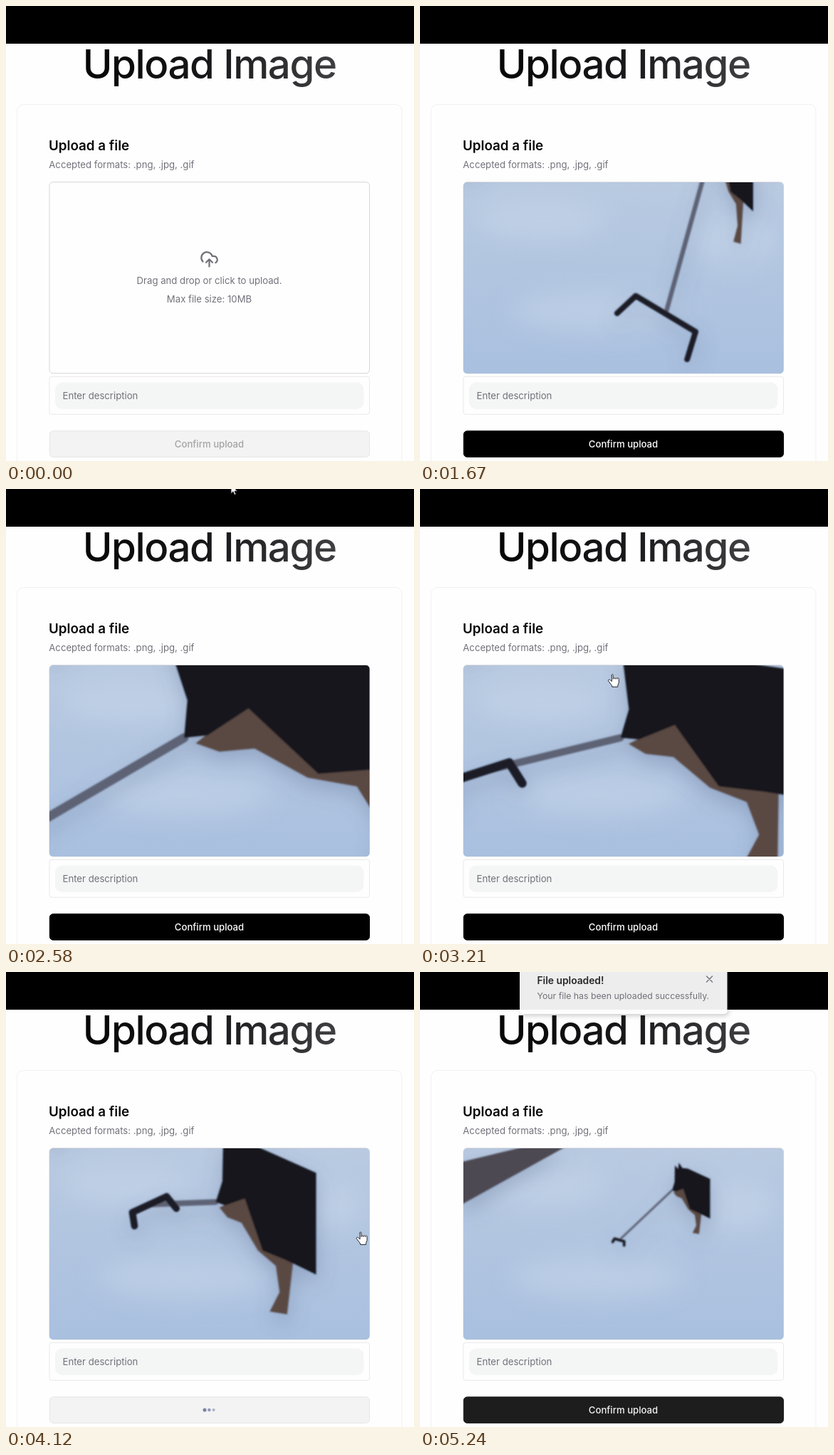
Write an HTML page that moves like this. It is 573 px wide and 640 px high and loops after 5310 ms.

```html
<!DOCTYPE html>
<html lang="en">
<head>
<meta charset="utf-8">
<title>Upload Image</title>
<style>
  html, body { margin: 0; width: 100%; height: 100%; overflow: hidden; background: #fefefe; }
  svg { display: block; }
  text { font: 13.16px Inter, sans-serif; fill: #71717a; }
  .mid { text-anchor: middle; }
  #title { font-size: 56.4px; font-weight: 500; letter-spacing: -.025em; fill: url(#ink); }
  #heading { font-size: 18.8px; font-weight: 600; fill: #09090b; }
  #label { font-weight: 500; }
  .line { fill: none; stroke-linecap: round; stroke-linejoin: round; }
</style>
</head>
<body>
<svg width="573" height="640" viewBox="0 0 573 640">
  <defs>
    <linearGradient id="ink" gradientUnits="userSpaceOnUse" x1="109" x2="463" y1="0" y2="0">
      <stop stop-color="#060607"/><stop offset=".5" stop-color="#18181a"/><stop offset="1" stop-color="#3f3f42"/>
    </linearGradient>
    <linearGradient id="snow" x2="0" y2="1">
      <stop stop-color="#b9cae1"/><stop offset="1" stop-color="#a9c0df"/>
    </linearGradient>
    <clipPath id="frame"><rect x="61" y="248" width="449.5" height="269" rx="5"/></clipPath>
    <filter id="soft" filterUnits="userSpaceOnUse" x="0" y="200" width="573" height="380">
      <feGaussianBlur stdDeviation="1.3"/>
      <feDropShadow dy="12" stdDeviation="14" flood-color="#5f7090" flood-opacity=".35"/>
    </filter>
    <filter id="haze" x="-50%" y="-50%" width="200%" height="200%"><feGaussianBlur stdDeviation="16"/></filter>
    <filter id="shadow"><feDropShadow dy="3" stdDeviation="3" flood-opacity=".2"/></filter>
  </defs>

  <rect width="573" height="53" fill="#000"/>
  <text id="title" class="mid" x="285.7" y="102">Upload Image</text>
  <rect x="15.5" y="138.5" width="540.5" height="540" rx="9" fill="#fefefe" stroke="#f1f1f3"/>
  <text id="heading" x="60" y="203">Upload a file</text>
  <text x="60.3" y="228">Accepted formats: .png, .jpg, .gif</text>

  <rect id="drop" x="61" y="247.7" width="449.5" height="269" rx="5" fill="#fefefe"/>
  <g id="icon" class="line" stroke="#71717a" stroke-width="2">
    <path d="M4 14.899A7 7 0 1 1 15.71 8h1.79a4.5 4.5 0 0 1 2.5 8.242M12 12v9M16 16l-4-4-4 4"/>
  </g>
  <text class="mid" x="285.5" y="391">Drag and drop or click to upload.</text>
  <text class="mid" x="285.5" y="417.3">Max file size: 10MB</text>

  <g id="photo" clip-path="url(#frame)">
    <rect x="61" y="247" width="450" height="271" fill="url(#snow)"/>
    <g fill="#c6d5ea" filter="url(#haze)" opacity=".55">
      <ellipse cx="170" cy="300" rx="90" ry="28"/><ellipse cx="250" cy="430" rx="120" ry="30"/>
      <ellipse cx="440" cy="330" rx="60" ry="35"/>
    </g>
    <g filter="url(#soft)">
      <path id="fence" d="M55 268L150 245H206L55 329z" fill="#4d4a53"/>
      <path id="handle" class="line" stroke="#5d6274"/>
      <path id="blade" class="line" stroke="#1b1d27" vector-effect="non-scaling-stroke" d="M-.6 .35L-.5 0H.5L.6 .4"/>
      <g id="dog">
        <path d="M8 8L62-10 100 68 165 85 152 162 115 158 136 130 128 92 90 70 55 30 25 22z" fill="#5a4842"/>
        <path d="M0 0L14-30 16-92 34-78 38-102 58-82 88-80 214-42V105L150 84 100 70 62-5 20 5z" fill="#17171f"/>
      </g>
    </g>
  </g>

  <rect x="61" y="521.3" width="449.5" height="53" rx="3" fill="#fefefe" stroke="#e9e9eb"/>
  <rect x="69" y="529.5" width="433.5" height="37.5" rx="10" fill="#f4f5f5"/>
  <text x="79.5" y="553">Enter description</text>

  <rect id="button" x="61.3" y="597.8" width="449.2" height="36.6" rx="5"/>
  <text id="label" class="mid" x="285.5" y="621">Confirm upload</text>
  <g id="dots" fill="#5f6e9c">
    <circle cx="279" cy="616"/><circle cx="285.4" cy="616"/><circle cx="291.6" cy="616"/>
  </g>

  <g id="toast">
    <rect x="140" y="-20" width="291.5" height="79" rx="5" fill="#fff" fill-opacity=".92" filter="url(#shadow)"/>
    <text x="164.5" y="16.8" style="font-size:13.8px;font-weight:600;fill:#27272a">File uploaded!</text>
    <text x="164.5" y="38" style="font-size:12.3px">Your file has been uploaded successfully.</text>
    <path class="line" d="M402.5 6l8 8m0-8l-8 8" stroke="#71717a" stroke-width="1.4"/>
  </g>
  <path id="cursor" fill="#fff" stroke="#26262c" stroke-linejoin="round"/>
</svg>
<script>
const LOOP = 5310, HOLD = 270, STEP = 70;
const PICK = 1390, RETURN = 1880, HOVER = 3500, SEND = 3840, DONE = 5030, LEAVE = 4750;

const $ = id => document.getElementById(id);
const set = (id, attrs) => { for (const k in attrs) $(id).setAttribute(k, attrs[k]); };
const show = (id, opacity) => set(id, { opacity: +opacity });
const ramp = (t, from, to) => Math.min(1, Math.max(0, (t - from) / (to - from)));
const blend = (a, b, p) => a.map((v, i) => v + (b[i] - v) * p);

// Rows start with their time
function between(rows, t) {
  let i = 0;
  while (i < rows.length - 2 && t >= rows[i + 1][0]) i++;
  return blend(rows[i], rows[i + 1], ramp(t, rows[i][0], rows[i + 1][0])).slice(1);
}

const ARROW = 'M0 0v12.5l3-2.8 2 4.6 2-.9-2-4.4h4z';
const HAND = 'M-1.5 1.5v9l-2.5-2.5c-1.5-1-3 .5-2 2l5 6.5v1.5h8v-2l1.5-4v-5c0-2-2.5-2-2.5 0 0-2-2.7-2-2.7 0 0-2-2.8-2-2.8 0v-5c0-2.3-2-2.3-2 0z';

// time, x, y
const waypoints = [
  [HOLD, 580, 380], [1040, 457, 422], [PICK, 457, 422], [RETURN, 535, 330], [2370, 358, 42], [2580, 316, -6],
  [2900, 300, -20], [3600, 234, 613], [SEND, 234, 613], [4050, 522, 400], [4540, 358, 158], [LEAVE, 358, 158]
];

// time, mouth x and y, width, height and tilt of the dog, then x, y, size and tilt of the shovel
const shots = [
  [1670, 408, 205, .28, .8, 0, 345, 433, 98, 31],
  [2580, 250, 350, 1.6, 1.6, -20, -20, 508, 100, 0],
  [3700, 306, 350, 1, 1, 0, 168, 312, 70, -32],
  [4540, 283, 297, .32, .95, 0, 235, 342, 36, -18],
  [5240, 354, 307, .25, .38, 0, 280, 377, 14, 15]
];

function drawPhoto(t) {
  show('photo', ramp(t, 1310, 1530));
  const [x, y, width, height, tilt, bladeX, bladeY, size, bladeTilt] = between(shots, t);
  set('dog', { transform: `translate(${x} ${y}) rotate(${tilt}) scale(${width} ${height})` });
  set('handle', { d: `M${x} ${y}L${bladeX} ${bladeY}`, 'stroke-width': 8 * height });
  set('blade', {
    transform: `translate(${bladeX} ${bladeY}) rotate(${bladeTilt}) scale(${size})`,
    'stroke-width': 10 * height
  });
  set('fence', { transform: `translate(0 ${-90 * (1 - ramp(t, 4100, 5240))})` });
}

function drawPointer(t) {
  const [x, y] = between(waypoints, t);
  const inside = (top, bottom) => x > 61 && x < 510 && y > top && y < bottom;
  const overDrop = inside(248, 517), overButton = inside(597, 635) && t < SEND;
  show('cursor', (t >= HOLD && t < PICK) || (t >= RETURN && t < LEAVE));
  set('cursor', { d: overDrop || overButton ? HAND : ARROW, transform: `translate(${x} ${y})` });

  const hover = overDrop && t < PICK;
  set('drop', { stroke: hover ? '#8b8b95' : '#d6d6da', 'stroke-width': hover ? 1.5 : 1 });
  set('icon', { transform: `translate(285.5 356.3) scale(${hover ? 1.21 : 1.12}) translate(-12 -12)` });
}

// Button looks: fill, border and text as grey levels
const DISABLED = [243, 230, 164], READY = [0, 0, 254], HOVERED = [254, 0, 16];
const grey = v => `rgb(${v},${v},${v})`;

function drawButton(t) {
  const hovered = t >= HOVER && t < SEND, loading = t >= SEND && t < DONE;
  const look = hovered ? blend(READY, HOVERED, ramp(t, HOVER, 3640))
    : blend(DISABLED, READY, t < SEND ? ramp(t, PICK, 1600) : .88 * ramp(t, DONE, 5240));
  const [fill, stroke, text] = look.map(grey);
  set('button', { fill, stroke, 'stroke-width': hovered ? 1.6 : 1 });
  $('label').style.fill = text;
  show('label', !loading);
  show('dots', loading);
  [...$('dots').children].forEach((dot, i) => {
    const pulse = .5 + .5 * Math.sin((t - 4540) / 130 + i * .8 - .5);
    dot.setAttribute('r', 2 + .7 * pulse);
    dot.setAttribute('opacity', .45 + .5 * pulse);
  });
}

function drawToast(t) {
  const left = (1 - ramp(t, 4960, 5240)) ** 2;
  show('toast', left < 1);
  set('toast', { transform: `translate(0 ${-70 * left})` });
}

function draw(now) {
  const time = now % LOOP;
  const t = time < HOLD ? 0 : HOLD + Math.floor((time - HOLD) / STEP) * STEP;
  drawPointer(t);
  drawPhoto(t);
  drawButton(t);
  drawToast(t);
  requestAnimationFrame(draw);
}
draw(performance.now());
</script>
</body>
</html>
```
